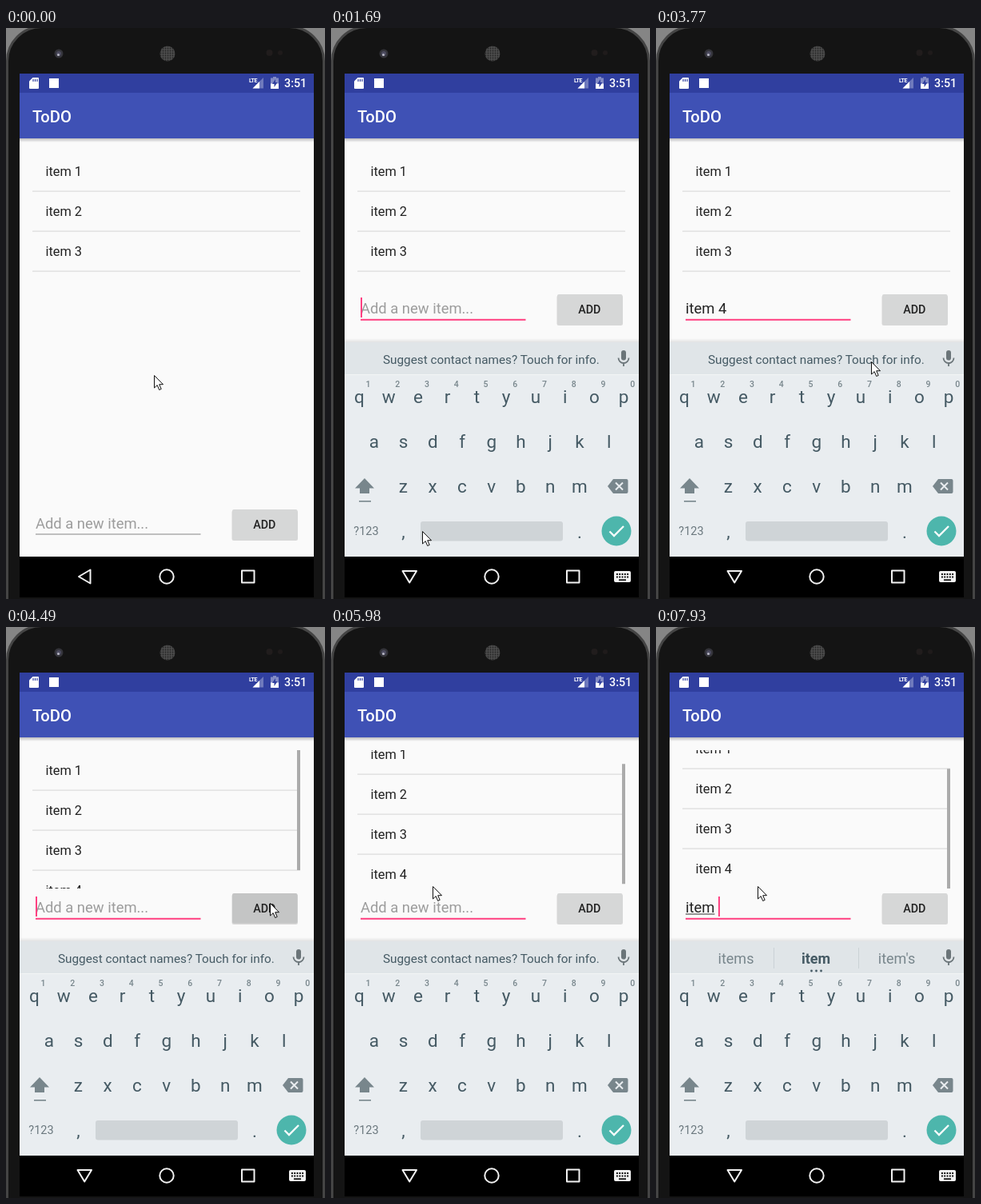
Recreate the animation shown at these times as an HTML page. Size 399 px wide and 714 px high, loop 8 s.

```html
<!DOCTYPE html>
<html lang="en">
<head>
<meta charset="utf-8">
<title>ToDO</title>
<style>
html, body { margin: 0; width: 100%; height: 100%; overflow: hidden; background: #141414; }
svg { display: block; width: 399px; height: 714px; font-family: Roboto, sans-serif; }
text { white-space: pre; }
.mid { text-anchor: middle; }
.medium { font-weight: 500; }
#rows text { font-size: 16.35px; fill: #212121; }
#rows rect { fill: #dedede; }
#field, #hint { font-size: 18.4px; }
#field { fill: #212121; }
#hint { fill: #9c9c9c; }
.key { font-size: 22.5px; fill: #455a64; }
.digit { font-size: 10.5px; font-weight: 500; fill: #78868c; }
.word { font-size: 18px; fill: #78868c; }
.icon { fill: #78868c; }
.nav { fill: none; stroke: #f2f2f2; stroke-width: 2; stroke-linejoin: round; }
</style>
</head>
<body>
<svg viewBox="0 0 399 714">
  <defs>
    <linearGradient id="fall" x2="0" y2="1">
      <stop offset="0" stop-opacity=".24"/><stop offset="1" stop-opacity="0"/>
    </linearGradient>
    <linearGradient id="rise" x2="0" y2="1">
      <stop offset="0" stop-opacity="0"/><stop offset="1" stop-opacity=".1"/>
    </linearGradient>
    <pattern id="mesh" width="3" height="3" patternUnits="userSpaceOnUse">
      <rect width="3" height="3" fill="#4c4c4c"/><circle cx="1.5" cy="1.5" r=".9" fill="#262626"/>
    </pattern>
    <clipPath id="listClip"><rect id="listBox" x="33" y="154" width="336" height="173"/></clipPath>
  </defs>

  <!-- phone body -->
  <rect width="399" height="714" fill="#858585"/>
  <rect x="1.5" y="-1.5" width="396" height="780" rx="43" fill="#141414" stroke="#444" stroke-width="3"/>
  <circle cx="66" cy="32" r="5.5" fill="#34343a"/>
  <circle cx="66" cy="32" r="3" fill="#4d4c60"/>
  <circle cx="65.5" cy="33.5" r="1.5" fill="#b9b9c6"/>
  <circle cx="202" cy="32" r="9.5" fill="url(#mesh)"/>
  <circle cx="329.500" cy="31" r="4" fill="#211d1d"/>
  <circle cx="343" cy="31" r="3" fill="#1f1b1b"/>

  <!-- app -->
  <rect x="17" y="57" width="368" height="655" fill="#fafafa"/>
  <rect x="17" y="138" width="368" height="5" fill="url(#fall)"/>
  <rect x="17" y="57" width="368" height="24" fill="#303f9f"/>
  <rect x="17" y="81" width="368" height="57" fill="#3f51b5"/>
  <text x="33" y="117.500" class="medium" font-size="20.200" fill="#fff">ToDO</text>

  <!-- status bar -->
  <g fill="#fff">
    <path d="M33.500 62H40a1 1 0 0 1 1 1V75a1 1 0 0 1-1 1H30a1 1 0 0 1-1-1V66.500Z"/>
    <path d="M34 64v3M36.500 64v3M39 64v3" stroke="#303f9f" stroke-width="1.200"/>
    <rect x="54" y="63" width="12" height="12"/>
    <text x="304" y="68" font-size="7" font-weight="700" letter-spacing="-.5">LTE</text>
    <path d="M322 62V75.500H308.500Z" opacity=".3"/>
    <path d="M317 67V75.500H308.500Z"/>
    <path d="M334 61h4v1.500h3V76H331V62.500h3Z" opacity=".4"/>
    <path d="M331 69.500h10V76h-10Z"/>
    <path d="M337 64l-4 6h2.500v4l4-6H337Z" fill="#303f9f"/>
    <text x="348" y="74" class="medium" font-size="14.300">3:51</text>
  </g>

  <g clip-path="url(#listClip)">
    <g id="rows"></g>
    <rect id="bar" x="364" width="4" height="150" fill="#ababab"/>
  </g>

  <g id="form">
    <rect id="line" x="37" width="206.500"/>
    <text id="hint" x="37" y="626">Add a new item...</text>
    <text id="field" x="37" y="626"></text>
    <rect id="compose" x="37" y="627.500" height="1" fill="#333"/>
    <rect id="caret" y="606" width="2" height="25" fill="#ff4081"/>
    <rect x="282.500" y="603" width="82.500" height="38" rx="2.500" opacity=".14"/>
    <rect id="button" x="283" y="602" width="81.500" height="37.500" rx="2"/>
    <text x="323.300" y="626" class="mid medium" font-size="14.300" fill="#212121">ADD</text>
  </g>

  <!-- navigation bar -->
  <rect x="17" y="661" width="368" height="51"/>
  <path id="back" class="nav"/>
  <circle cx="201" cy="686" r="8.700" class="nav"/>
  <rect x="295" y="678.500" width="15.500" height="15" class="nav"/>
  <g id="navKeys">
    <rect x="354" y="679" width="21" height="14" rx="2" fill="#f2f2f2"/>
    <path d="M357 683h15M357 686.500h15" stroke="#000" stroke-width="1.800" stroke-dasharray="1.800 1.500"/>
    <path d="M360 690.200h9" stroke="#000" stroke-width="1.600"/>
  </g>

  <g id="board">
    <rect x="17" y="388" width="368" height="5" fill="url(#rise)"/>
    <rect x="17" y="393" width="368" height="268" fill="#e9edf0"/>
    <rect x="17" y="393" width="368" height="40" fill="#e0e5e8"/>
    <rect x="17" y="433" width="368" height="1" fill="#f3f5f6"/>
    <text id="notice" x="65" y="419.800" font-size="15.300" fill="#455a64">Suggest contact names? Touch for info.</text>
    <g id="words">
      <text x="100" y="420.500" class="mid word">items</text>
      <text x="200" y="420.500" class="mid word" style="font-weight:700;fill:#455a64">item</text>
      <text x="301" y="420.500" class="mid word">item's</text>
      <path d="M147.500 401v26M253.500 401v26" stroke="#cbd2d6"/>
      <path d="M194.500 430h.01M200.500 430h.01M206.500 430h.01" stroke="#455a64" stroke-width="2.800" stroke-linecap="round"/>
    </g>
    <g fill="#6b7579">
      <rect x="363" y="403" width="6" height="12.500" rx="3"/>
      <path d="M359.500 412.500a6.500 6.500 0 0 0 13 0M366 419v4" fill="none" stroke="#6b7579" stroke-width="1.800"/>
    </g>
    <g id="keys"></g>
    <path class="icon" d="M42 563L54 575.500H48V582H36V575.500H30Z"/>
    <rect class="icon" x="35" y="591" width="15" height="1.600"/>
    <path class="icon" d="M353 564H369.500a2 2 0 0 1 2 2V580a2 2 0 0 1-2 2H353L346 573Z"/>
    <path d="M356 568.500l9 9M365 568.500l-9 9" stroke="#e9edf0" stroke-width="2"/>
    <text x="44" y="634" class="mid" font-size="14.500" fill="#6b787e">?123</text>
    <rect x="112" y="617" width="178" height="24.500" rx="3" fill="#cfd4d7"/>
    <circle cx="357" cy="629" r="18.500" fill="#4db6ac"/>
    <path d="M348.500 629.500l5.500 5.500L366 623" fill="none" stroke="#fff" stroke-width="2.300"/>
  </g>

  <path id="mouse" d="M.5.5V16L4.200 12.600 6.700 18.500 9.200 17.400 6.700 11.700H11.500Z" fill="#fff" stroke="#111"/>
</svg>

<script>
const LOOP = 8000;
const $ = id => document.getElementById(id);

function add(parent, tag, attrs, text = '') {
  const el = document.createElementNS('http://www.w3.org/2000/svg', tag);
  for (const name in attrs) el.setAttribute(name, attrs[name]);
  el.textContent = text;
  parent.append(el);
  return el;
}

for (let i = 0; i < 4; i++) {
  add($('rows'), 'text', { x: 49.5, y: 185.3 + 50 * i }, `item ${i + 1}`);
  add($('rows'), 'rect', { x: 33, y: 203.5 + 50 * i, width: 335, height: 1.3 });
}
const newItem = $('rows').children[6], lastLine = $('rows').children[7];

const keyRows = [['qwertyuiop', 35.4, 469], ['asdfghjkl', 53.8, 525], ['zxcvbnm', 90.4, 581]];
for (const [letters, x, y] of keyRows) {
  [...letters].forEach((c, i) => add($('keys'), 'text', { class: 'mid key', x: x + 36.75 * i, y }, c));
}
[...'1234567890'].forEach((c, i) =>
  add($('keys'), 'text', { class: 'mid digit', x: 46.6 + 36.75 * i, y: 449.3 }, c));
add($('keys'), 'text', { class: 'mid key', x: 90.4, y: 637 }, ',');
add($('keys'), 'text', { class: 'mid key', x: 311, y: 637.5 }, '.');

// Each track holds [start, ...values]; a value stays until the next start.
const mouse = [
  [0, 185, 434], [120, 180, 448], [240, 162, 502], [350, 135, 573], [470, 115, 622], [590, 110, 631],
  [950, 112, 631], [1070, 114, 629],
  [3530, 128, 611], [3650, 200, 512], [3770, 269, 417], [3890, 318, 350], [4010, 340, 318],
  [4130, 344, 311], [4250, 336, 332], [4370, 330, 345],
  [4610, 322, 356], [4730, 280, 386], [4850, 225, 399], [4940, 188, 390], [5060, 176, 381],
  [5520, 165, 365], [5640, 140, 338], [5750, 127, 324]
];
const typed = [
  [0, ''], [1940, 'i'], [2060, 'it'], [2180, 'ite'], [2420, 'item'], [2910, 'item '], [3160, 'item 4'],
  [4490, ''], [7080, 'i'], [7200, 'it'], [7320, 'ite'], [7560, 'item'], [7930, 'item ']
];
const caretOn = [
  [0, 0], [590, 1], [1190, 0], [1690, 1], [3650, 0], [4130, 1], [4850, 0],
  [5400, 1], [5870, 0], [6460, 1], [6960, 0], [7080, 1]
];
const scroll = [[0, 0], [5870, 9], [5980, 20], [6100, 27]];
const barAlpha = [[0, 0], [4490, 1], [6220, .65], [6340, .3], [6460, 0], [7080, 1]];
const board = [[0, 0, 0], [710, 16, .45], [830, 4, .88], [950, 0, 1]]; // offset, opacity

const at = (track, t) => track.findLast(step => step[0] <= t).slice(1);
const within = (t, from, to) => t >= from && t < to;
const set = (id, name, value) => $(id).setAttribute(name, value);
const show = (el, on) => el.setAttribute('visibility', on ? 'visible' : 'hidden');

function render(t) {
  const focused = t >= 590, raised = t >= 710, added = t >= 4490;
  const [text] = at(typed, t), [dy] = at(scroll, t), [offset, alpha] = at(board, t);

  set('mouse', 'transform', `translate(${at(mouse, t)})`);
  set('form', 'transform', `translate(0 ${raised ? -269 : 0})`);
  set('board', 'transform', `translate(0 ${offset})`);
  set('board', 'opacity', alpha);
  set('back', 'd', raised ? 'M89.500 679H107L98.200 693.500Z' : 'M91 686L105.500 677.500V694.500Z');
  show($('navKeys'), raised);

  set('line', 'y', focused ? 632.8 : 632.5);
  set('line', 'height', focused ? 2 : 1);
  set('line', 'fill', focused ? '#ff4081' : '#858585');
  set('button', 'fill', within(t, 4370, 4610) ? '#c4c5c5' : '#d6d7d7');

  $('field').textContent = text;
  show($('hint'), !text);
  const width = text ? $('field').getComputedTextLength() : 0;
  set('caret', 'x', 37 + width);
  show($('caret'), at(caretOn, t)[0]);
  const composing = within(t, 1940, 2910) || t >= 7080;
  set('compose', 'width', text.endsWith(' ') ? Math.max(0, width - 4.5) : width);
  show($('compose'), composing);

  const suggesting = within(t, 2180, 3160) || t >= 7320;
  show($('words'), suggesting);
  show($('notice'), !suggesting);

  set('rows', 'transform', `translate(0 ${-dy})`);
  show(newItem, added);
  show(lastLine, false);
  set('bar', 'y', 154 + 23.3 * dy / 27);
  set('bar', 'opacity', at(barAlpha, t)[0]);
}

const start = performance.now();
function tick() {
  render((performance.now() - start) % LOOP);
  requestAnimationFrame(tick);
}
tick();
</script>
</body>
</html>
```
